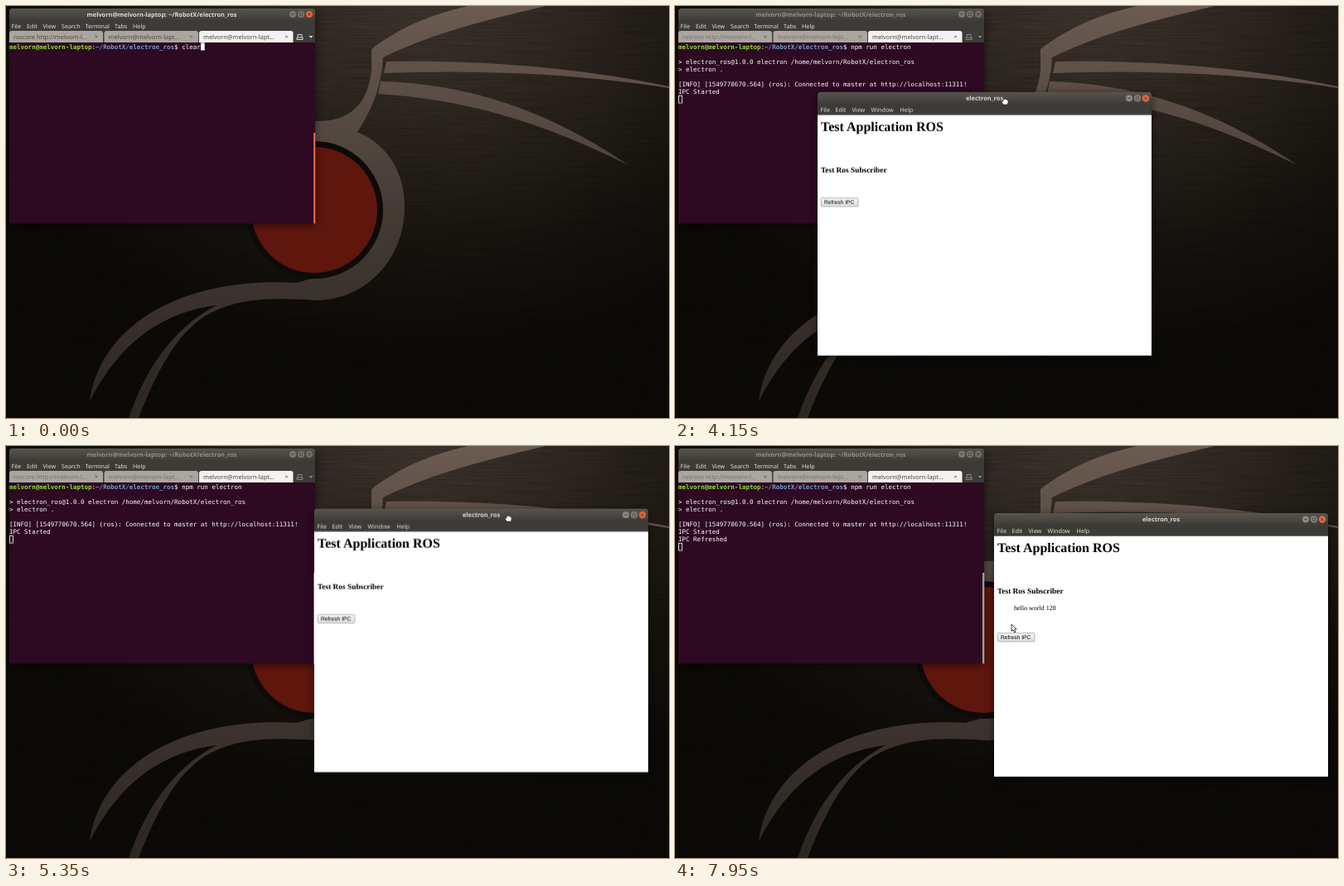
These frames come from a looping animation (800x497 px, 8 s). An HTML page:

```html
<!DOCTYPE html>
<html lang="en">
<head>
<meta charset="utf-8">
<title>Terminal and ROS window</title>
<style>
html, body { margin: 0; width: 100%; height: 100%; overflow: hidden; background: #0c0a07; }
svg { position: absolute; left: 0; top: 0; width: 800px; height: 497px; overflow: visible; }
text { white-space: pre; text-rendering: geometricPrecision; }
.stage { position: absolute; width: 800px; height: 497px; overflow: hidden; }
.stage, .step { animation: 8s step-end infinite; }
.stage { animation-name: focus; }
.ui { font: 7.2px "Noto Sans", "Open Sans", sans-serif; fill: #dfdbd2; }
.title { font-weight: bold; font-size: 7.4px; text-anchor: middle; }
.mono { font: 7.52px "DejaVu Sans Mono", monospace; fill: #fff; }
.user { fill: #8ae234; font-weight: bold; }
.path { fill: #729fcf; font-weight: bold; }
.serif { font-family: "Liberation Serif", serif; fill: #000; }
.shadow { filter: drop-shadow(0 2px 5px rgba(0, 0, 0, .55)); }
.glyph { fill: none; stroke: #3c3b37; stroke-width: .8; }

#term { z-index: 2; }
#win { animation: drag 8s linear infinite; }
#lift { position: absolute; animation-name: raise; }
#open { transform-origin: 201px 158px; animation: open 8s linear infinite; }
#mouse { z-index: 5; animation: mouse 8s linear infinite; }
#caret { animation-name: caret; }
#hollow { animation-name: hollow; }
#old { animation-name: old; }
#command { animation-name: command; }
#run { animation-name: run; }
#info { animation-name: info; }
.refreshed { animation-name: refreshed; }
#button { animation-name: button; }
#beam { animation-name: beam; }
#hand { animation-name: hand; }
#arrow { animation-name: arrow; }

@keyframes focus {
  0% { --title: #dfdbd2; --close: #e9633a; --scroll: #dc6340; --tab: #4c4944; --icon: #dfdbd2; }
  25%, 100% { --title: #949087; --close: #706e67; --scroll: #a39d98; --tab: #77736d; --icon: #8c8981; }
}
@keyframes old { 0% { visibility: visible } 2.5%, 100% { visibility: hidden } }
@keyframes command { 0% { visibility: hidden } 2.5%, 100% { visibility: visible } }
@keyframes run { 0% { visibility: hidden } 17.5%, 100% { visibility: visible } }
@keyframes info { 0% { visibility: hidden } 26.25%, 100% { visibility: visible } }
@keyframes refreshed { 0% { visibility: hidden } 93.75%, 100% { visibility: visible } }
@keyframes button { 0% { transform: none } 93.75%, 100% { transform: translateY(17px) } }
@keyframes caret {
  0% { transform: translate(230.9px, 0); opacity: 1; }
  2.5% { transform: translate(280.7px, 0); opacity: 1; }
  10% { transform: translate(280.7px, 0); opacity: 0; }
  14.375% { transform: translate(0, 9.1px); opacity: 1; }
  17.5% { transform: translate(0, 45.5px); opacity: 1; }
  21.875%, 100% { transform: translate(0, 45.5px); opacity: 0; }
}
@keyframes hollow {
  0% { transform: translate(0, 45.5px); opacity: 0; }
  25% { transform: translate(0, 45.5px); opacity: 1; }
  26.25% { transform: translate(0, 63.7px); opacity: 1; }
  93.75%, 100% { transform: translate(0, 72.8px); opacity: 1; }
}
@keyframes open {
  0%, 25% { transform: scale(.01, .05); opacity: 0; animation-timing-function: cubic-bezier(.16, 1, .3, 1); }
  28.75%, 100% { transform: none; opacity: 1; }
}
@keyframes raise { 0% { z-index: 1 } 51.25%, 100% { z-index: 3 } }
@keyframes drag {
  0%, 54.375% { transform: translate(172px, 103.8px); }
  61.875% { transform: translate(291.7px, 82.3px); }
  64.375% { transform: translate(316px, 78px); }
  66.875% { transform: translate(371.8px, 75.6px); }
  70% { transform: translate(383px, 79px); }
  75% { transform: translate(376px, 81px); }
  78.125% { transform: translate(380.3px, 81px); }
  80.625%, 100% { transform: translate(385px, 81px); }
}
@keyframes mouse {
  0%, 31.875% { transform: translate(345px, 92px); }
  33.125% { transform: translate(300px, 100px); }
  34.375% { transform: translate(263px, 111px); }
  36.25% { transform: translate(253px, 124px); }
  38.75%, 41.875% { transform: translate(262px, 141px); }
  43.125%, 46.25% { transform: translate(332px, 141px); }
  50%, 54.375% { transform: translate(398px, 115px); }
  61.875% { transform: translate(521px, 94px); }
  64.375% { transform: translate(546px, 90px); }
  66.875% { transform: translate(606px, 87px); }
  70% { transform: translate(613px, 90px); }
  75% { transform: translate(604px, 93px); }
  78.125% { transform: translate(608px, 93px); }
  80.625%, 83.125% { transform: translate(612px, 93px); }
  88.125% { transform: translate(470px, 284px); }
  93.125%, 100% { transform: translate(406px, 215px); }
}
@keyframes beam { 0% { opacity: 0 } 31.875% { opacity: 1 } 48.6%, 100% { opacity: 0 } }
@keyframes hand { 0% { opacity: 0 } 51.25% { opacity: 1 } 81.25%, 100% { opacity: 0 } }
@keyframes arrow { 0% { opacity: 0 } 48.6% { opacity: 1 } 51.25% { opacity: 0 } 81.25%, 100% { opacity: 1 } }
</style>
</head>
<body>
<div class="stage">

<svg id="wallpaper" viewBox="0 0 800 497">
  <defs>
    <radialGradient id="glow" gradientUnits="userSpaceOnUse" cx="0" cy="0" r="1" gradientTransform="translate(500 -20) scale(560 440)">
      <stop offset="0" stop-color="#40362f"/><stop offset=".35" stop-color="#2e2721"/>
      <stop offset=".7" stop-color="#18140f"/><stop offset="1" stop-color="#0c0a07"/>
    </radialGradient>
    <linearGradient id="wing" gradientUnits="userSpaceOnUse" x1="0" y1="0" x2="0" y2="497">
      <stop offset="0" stop-color="#6b5b51"/><stop offset=".5" stop-color="#453b35"/><stop offset="1" stop-color="#2c2520"/>
    </linearGradient>
    <linearGradient id="bar" x2="0" y2="1">
      <stop offset="0" stop-color="#57554c"/><stop offset="1" stop-color="#3e3d38"/>
    </linearGradient>
    <linearGradient id="face" x2="0" y2="1">
      <stop offset="0" stop-color="#f6f6f6"/><stop offset="1" stop-color="#dcdcdc"/>
    </linearGradient>
    <filter id="brushed" x="0" y="0" width="1" height="1">
      <feTurbulence type="fractalNoise" baseFrequency=".015 .7" numOctaves="2" seed="4"/>
      <feColorMatrix values="0 0 0 0 0  0 0 0 0 0  0 0 0 0 0  .4 0 0 0 -.13"/>
    </filter>
  </defs>
  <rect width="800" height="497" fill="url(#glow)"/>
  <rect width="800" height="497" filter="url(#brushed)"/>
  <g fill="url(#wing)">
    <path d="M441 52C475 26 515 8 572-3H665C590 14 515 32 455 62C453 98 441 126 424 152C462 168 481 202 481 243C480 310 430 356 372 355C330 352 280 350 240 374C206 396 182 440 160 497H148C166 445 196 392 254 361C190 369 138 404 101 477C113 389 206 326 350 334L372 328V139C412 140 436 122 441 78Z"/>
    <path d="M459 67Q640 64 800 97V99Q640 74 456 81Z"/>
    <path d="M452 91C560 93 660 129 751 192C650 142 560 113 449 106Z"/>
  </g>
  <circle cx="372" cy="246" r="83" fill="#0d0b08"/>
  <circle cx="372" cy="246" r="76" fill="#5e160d"/>
</svg>

<svg id="term" viewBox="0 0 800 497">
  <path class="shadow" d="M4 262V7Q4 3 8 3H369Q373 3 373 7V262Z" fill="#3c3b37"/>
  <path d="M4 17V7Q4 3 8 3H369Q373 3 373 7V17Z" fill="url(#bar)"/>
  <g class="ui">
    <text class="title" x="188" y="12.7" style="fill:var(--title)">melvorn@melvorn-laptop: ~/RobotX/electron_ros</text>
    <g fill="#7b7871">
      <circle cx="346" cy="10" r="4"/><circle cx="356" cy="10" r="4"/>
      <circle cx="366" cy="10" r="4" style="fill:var(--close)"/>
    </g>
    <path class="glyph" d="M344 10h4M354.3 8.3h3.4v3.4h-3.4zM364.5 8.5l3 3m0-3l-3 3"/>
    <text x="6.5" y="26.7">File</text><text x="25" y="26.7">Edit</text><text x="44.5" y="26.7">View</text>
    <text x="67" y="26.7">Search</text><text x="95.5" y="26.7">Terminal</text>
    <text x="131" y="26.7">Tabs</text><text x="153" y="26.7">Help</text>
    <path d="M4 44V33Q4 30 7 30H114Q117 30 117 33V44ZM118.5 44V33Q118.5 30 121.5 30H229Q232 30 232 33V44Z" fill="#aaa59e"/>
    <path d="M233 44V33Q233 30 236 30H343.5Q346.5 30 346.5 33V44Z" fill="#f4f2f0"/>
    <g style="fill:var(--tab);font-size:7.4px">
      <text x="9" y="39.9">roscore http://melvorn-l…</text>
      <text x="123.5" y="39.9">melvorn@melvorn-lapt…</text>
      <text x="238" y="39.9" fill="#4c4944">melvorn@melvorn-lapt…</text>
    </g>
    <path d="M107.5 35.5l3 3m0-3l-3 3M222 35.5l3 3m0-3l-3 3M337 35.5l3 3m0-3l-3 3" stroke="#5d5a55" stroke-width=".8"/>
    <path d="M352 37.5v-3h5v3M351 38h7v2.5h-7z" fill="none" style="stroke:var(--icon)"/>
    <path d="M365.5 36h5l-2.5 2.8z" style="fill:var(--icon)"/>
  </g>
  <rect x="4" y="44" width="369" height="218.5" fill="#2d0922"/>
  <rect x="371" y="153" width="2.3" height="109.5" style="fill:var(--scroll)"/>
  <g class="mono">
    <text x="4" y="51.7"><tspan class="user">melvorn@melvorn-laptop</tspan>:<tspan class="path">~/RobotX/electron_ros</tspan>$</text>
    <text id="old" class="step" x="212.2" y="51.7">clear</text>
    <text id="command" class="step" x="212.2" y="51.7">npm run electron</text>
    <g id="run" class="step">
      <text x="4" y="69.9">&gt; electron_ros@1.0.0 electron /home/melvorn/RobotX/electron_ros</text>
      <text x="4" y="79">&gt; electron .</text>
    </g>
    <g id="info" class="step">
      <text x="4" y="97.2">[INFO] [1549770670.564] (ros): Connected to master at http://localhost:11311!</text>
      <text x="4" y="106.3">IPC Started</text>
    </g>
    <text class="step refreshed" x="4" y="115.4">IPC Refreshed</text>
    <rect id="caret" class="step" x="4.2" y="44.3" width="4.6" height="9.2"/>
    <rect id="hollow" class="step" x="4.5" y="44.6" width="4" height="8.6" fill="none" stroke="#fff" stroke-width=".8"/>
  </g>
</svg>

<div id="lift" class="step">
<svg id="win" viewBox="0 0 800 497">
  <g id="open">
    <path class="shadow" d="M0 317.8V4Q0 0 4 0H399Q403 0 403 4V317.8Z" fill="#3c3b37"/>
    <path d="M0 14V4Q0 0 4 0H399Q403 0 403 4V14Z" fill="url(#bar)"/>
    <rect y="27.7" width="403" height="290.1" fill="#fff"/>
    <g class="ui">
      <text class="title" x="201.5" y="10.2">electron_ros</text>
      <g fill="#8c8981"><circle cx="376" cy="7.5" r="4"/><circle cx="386" cy="7.5" r="4"/></g>
      <circle cx="396" cy="7.5" r="4.2" fill="#e9633a"/>
      <path class="glyph" d="M374 7.5h4M384.3 5.8h3.4v3.4h-3.4zM394.5 6l3 3m0-3l-3 3"/>
      <text x="3.5" y="24.2">File</text><text x="21.5" y="24.2">Edit</text><text x="41.5" y="24.2">View</text>
      <text x="64.5" y="24.2">Window</text><text x="99.5" y="24.2">Help</text>
    </g>
    <g class="serif">
      <text x="4" y="46.7" font-size="16" font-weight="bold">Test Application ROS</text>
      <text x="4" y="97.2" font-size="9.36" font-weight="bold">Test Ros Subscriber</text>
      <text id="hello" class="step refreshed" x="24" y="116.7" font-size="8">hello world 124</text>
    </g>
    <g id="button" class="step">
      <rect x="4.3" y="127.7" width="44.7" height="10.3" rx="1" fill="url(#face)" stroke="#a6a6a6" stroke-width=".8"/>
      <text x="8" y="135.3" font-family="Liberation Sans, Arial, sans-serif" font-size="6.67">Refresh IPC</text>
    </g>
  </g>
</svg>
</div>

<svg id="mouse" viewBox="0 0 800 497">
  <path id="beam" class="step" d="M-1.5-3.5h3M0-3.5v7M-1.5 3.5h3" fill="none" stroke="#eee" stroke-width=".9"/>
  <path id="hand" class="step" d="M-2 4L-4 .5Q-3.5-.5-2 0V-2Q-1-3.5 0-2.5Q1-3.5 2-2Q4-2.5 4 0V2L3 4Z" fill="#fff" stroke="#222" stroke-width=".7"/>
  <path id="arrow" class="step" d="M0 0V8.5L2 6.7L3.5 10L5 9.3L3.6 6.1H6.2Z" fill="#fff" stroke="#111" stroke-width=".8"/>
</svg>
</div>

<script>
const hello = document.getElementById('hello');

// The message counter ticks ten times a second once the subscriber is live.
function tick(now) {
  const live = Math.max(0, now % 8000 - 7500);
  hello.textContent = 'hello world ' + (124 + Math.floor(live / 100));
  requestAnimationFrame(tick);
}
requestAnimationFrame(tick);
</script>
</body>
</html>
```
